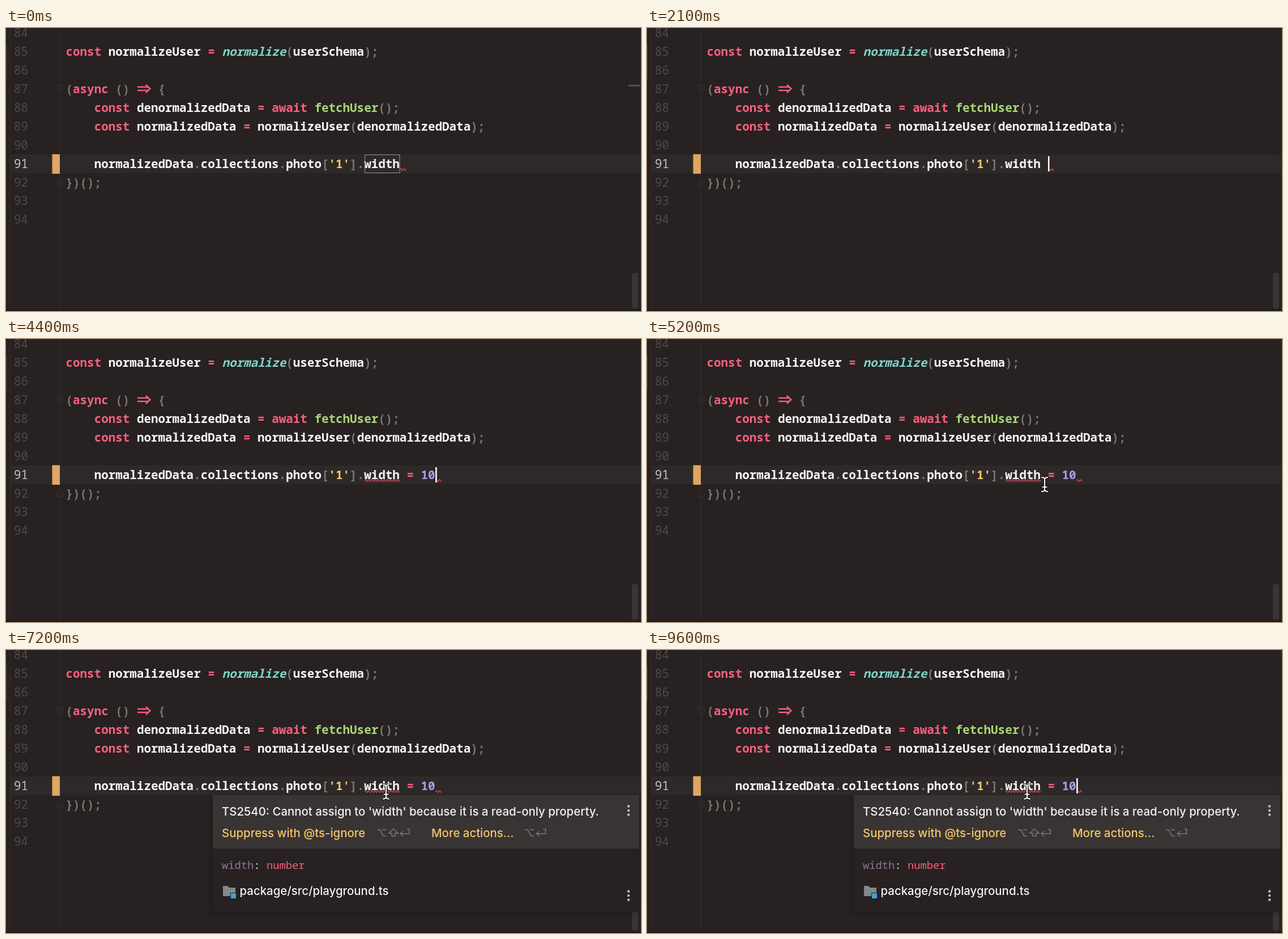
An HTML page with a canvas for the animation above (9800 ms loop, 1121 by 499 pixels).

```html
<!DOCTYPE html>
<html lang="en">
<head>
<meta charset="utf-8">
<title>Read-only property check</title>
<style>
html, body { margin: 0; width: 100%; height: 100%; overflow: hidden; background: #272121; }
canvas { display: block; width: 1121px; height: 499px; }
</style>
</head>
<body>
<canvas id="stage"></canvas>
<script>
const W = 1121, H = 499, LOOP = 9800;
const COL = 12.54, LEFT = 105.5, ROW = 32.93;
const MONO = '"Noto Sans Mono", "DejaVu Sans Mono", monospace';
const SANS = 'Inter, Roboto, sans-serif';
const C = {
  bg: '#272121', fg: '#fbf5f5', dim: '#7c7574', red: '#fa5f7e', green: '#a9d675',
  cyan: '#7dd6c8', yellow: '#f5c768', purple: '#a49fe6', num: '#4f4848', wave: '#e04a62'
};

const canvas = document.getElementById('stage');
const ctx = canvas.getContext('2d');
const dpr = window.devicePixelRatio || 1;
canvas.width = W * dpr;
canvas.height = H * dpr;

const xAt = col => LEFT + col * COL;
const baseline = row => 246.6 + (row - 91) * ROW;

function rect(x, y, w, h, color) {
  ctx.fillStyle = color;
  ctx.fillRect(x, y, w, h);
}

function text(str, x, y, color, font) {
  ctx.font = font;
  ctx.fillStyle = color;
  ctx.fillText(str, x, y);
}

function stroke(points, color, width) {
  ctx.strokeStyle = color;
  ctx.lineWidth = width;
  ctx.beginPath();
  points.forEach(([x, y], i) => i ? ctx.lineTo(x, y) : ctx.moveTo(x, y));
  ctx.stroke();
}

// Draws coloured spans on the character grid: [text, colour, style]
function code(row, col, spans) {
  for (const [str, color, style = ''] of spans) {
    text(str, xAt(col), baseline(row), C[color], `${style} 600 20.9px ${MONO}`);
    col += str.length;
  }
}

function wave(x, y, w) {
  const pts = [];
  for (let d = 0; d <= w; d += 0.5) pts.push([x + d, y - 1.6 * Math.sin(d / 5.6 * Math.PI * 2)]);
  stroke(pts, C.wave, 1.3);
}

function fold(y, dir) {
  stroke([[90, y - 6 * dir], [101, y - 6 * dir], [101, y + 2 * dir], [95.5, y + 7 * dir],
    [90, y + 2 * dir], [90, y - 6 * dir]], '#383232', 1);
  stroke([[93, y - dir], [98, y - dir]], '#383232', 1);
}

function arrow(x, y) {
  stroke([[x + 1, y - 3], [x + 20, y - 3]], C.red, 2.4);
  stroke([[x + 1, y + 3], [x + 20, y + 3]], C.red, 2.4);
  stroke([[x + 16, y - 7], [x + 23.5, y], [x + 16, y + 7]], C.red, 2.4);
}

function editor(t) {
  rect(0, 0, W, H, C.bg);
  rect(0, 28, 1, 62, '#4a4444');
  rect(7, 0, 1, H, '#332d2d');
  rect(8, 223, W - 8, 33, '#2e2929');
  rect(95, 0, 1, H, '#332d2d');
  rect(81.5, 222.5, 13.5, 34.5, '#dfa661');

  for (let n = 84; n <= 94; n++) {
    text(n, 14, baseline(n), n === 91 ? '#c8c2c2' : C.num, `500 20.9px ${MONO}`);
  }
  fold(107, 1);
  fold(272, -1);

  code(85, 0, [['const', 'red'], [' normalizeUser ', 'fg'], ['= ', 'red'],
    ['normalize', 'cyan', 'italic'], ['(', 'dim'], ['userSchema', 'fg'], [');', 'dim']]);
  code(87, 0, [['(', 'dim'], ['async', 'red'], [' ()', 'dim'], ['    {', 'dim']]);
  arrow(xAt(10), 107);
  code(88, 4, [['const', 'red'], [' denormalizedData ', 'fg'], ['= await ', 'red'],
    ['fetchUser', 'green'], ['();', 'dim']]);
  code(89, 4, [['const', 'red'], [' normalizedData ', 'fg'], ['= ', 'red'],
    ['normalizeUser', 'fg'], ['(', 'dim'], ['denormalizedData', 'fg'], [');', 'dim']]);
  code(91, 4, [['normalizedData', 'fg'], ['.', 'dim'], ['collections', 'fg'], ['.', 'dim'],
    ['photo', 'fg'], ['[', 'dim'], ["'1'", 'yellow'], ['].', 'dim'], ['width', 'fg']]);
  code(92, 0, [['})();', 'dim']]);

  // Usage marker, gone once the word is no longer selected
  if (t < 1900) rect(1099, 100, 22, 3, '#47545f');
  ctx.fillStyle = '#3a3535';
  ctx.beginPath();
  ctx.roundRect(1105, 432, 11, 63, 4);
  ctx.fill();
  rect(1119, 0, 1, H, '#312c2c');
  rect(0, 497, W, 2, '#1c1818');
}

// Each key press: time and the text after "width" from then on
const keys = [[-540, ''], [1600, ' '], [2900, ' ='], [3200, ' = '], [3900, ' = 1'], [4300, ' = 10']];
const BLINK = 520;

function typing(t) {
  const [time, tail] = keys.filter(k => k[0] <= t).pop();
  const end = xAt(47 + tail.length);

  if (!tail) {
    ctx.strokeStyle = '#8d8787';
    ctx.lineWidth = 1.2;
    ctx.strokeRect(633.5, 223.5, 61.5, 32);
  }
  code(91, 47, [[tail.slice(0, 3), 'red'], [tail.slice(3), 'purple']]);
  wave(end + 1, 249.5, 10);
  if (t >= 4300) wave(633, 249.5, 62);
  if (t >= 3000 && t < 4000) wave(LEFT, 283, 12);
  if ((t - time) % (2 * BLINK) < BLINK) rect(end + 0.5, 226, 2.5, 27, '#ffffff');
}

function optionKey(x) {
  stroke([[x, 317], [x + 5, 317], [x + 11, 328], [x + 16, 328]], C.dim, 1.6);
  stroke([[x + 9, 317], [x + 16, 317]], C.dim, 1.6);
}

function shiftKey(x) {
  stroke([[x + 5, 328], [x + 5, 323], [x, 323], [x + 8, 315.5], [x + 16, 323],
    [x + 11, 323], [x + 11, 328], [x + 5, 328], [x + 5, 323]], C.dim, 1.5);
}

function enterKey(x) {
  stroke([[x + 13, 316], [x + 17, 316], [x + 17, 324], [x + 1, 324]], C.dim, 1.6);
  stroke([[x + 6, 319.5], [x + 1, 324], [x + 6, 328.5]], C.dim, 1.6);
}

function dots(y) {
  ctx.fillStyle = '#bcb6b6';
  for (let i = -1; i <= 1; i++) {
    ctx.beginPath();
    ctx.arc(1099, y + i * 7.5, 2.3, 0, Math.PI * 2);
    ctx.fill();
  }
}

function popup() {
  ctx.save();
  ctx.shadowColor = 'rgba(0, 0, 0, 0.3)';
  ctx.shadowBlur = 10 * dpr;
  ctx.shadowOffsetY = 3 * dpr;
  rect(365, 256, 753, 205, C.bg);
  ctx.restore();
  rect(365, 256, 753, 94, '#393434');

  const ui = `500 20.4px ${SANS}`, mono = `500 18.75px ${MONO}`;
  text("TS2540: Cannot assign to 'width' because it is a read-only property.", 381, 292, '#f6f1f1', ui);
  text('Suppress with @ts-ignore', 381, 329.5, C.yellow, ui);
  text('More actions...', 751, 329.5, C.yellow, ui);
  optionKey(655);
  shiftKey(676);
  enterKey(695);
  optionKey(916);
  enterKey(935.5);

  text('width', 381, 386, '#8d7796', mono);
  text(':', 437.5, 386, C.fg, mono);
  text('number', 460, 386, C.red, mono);

  ctx.fillStyle = '#7f8a8c';
  ctx.beginPath();
  ctx.moveTo(383, 416);
  ctx.lineTo(391, 416);
  ctx.lineTo(394, 419);
  ctx.lineTo(405, 419);
  ctx.lineTo(405, 434);
  ctx.lineTo(383, 434);
  ctx.fill();
  rect(396, 428, 11, 10, C.bg);
  rect(397, 429, 9, 9, '#3aa5d8');
  text('package/src/playground.ts', 412.5, 431.5, '#f6f1f1', ui);
  dots(283);
  dots(433);
}

// Pointer moves: start, end, visible until, from, to
const moves = [
  [700, 1100, 1600, [741, 343], [733, 263]],
  [4800, 5600, LOOP, [733, 263], [671, 250]]
];

function pointer(t) {
  const move = moves.find(m => t >= m[0] && t < m[2]);
  if (!move) return;
  const [start, end, , from, to] = move;
  const p = Math.min(1, (t - start) / (end - start));
  const e = p * p * (3 - 2 * p);
  const x = from[0] + (to[0] - from[0]) * e;
  const y = from[1] + (to[1] - from[1]) * e;

  ctx.save();
  ctx.lineCap = 'round';
  for (const [color, width] of [['#151212', 4.2], ['#ffffff', 2]]) {
    stroke([[x - 5, y - 12.5], [x - 2, y - 12], [x, y - 10], [x + 2, y - 12], [x + 5, y - 12.5]], color, width);
    stroke([[x - 5, y + 12.5], [x - 2, y + 12], [x, y + 10], [x + 2, y + 12], [x + 5, y + 12.5]], color, width);
    stroke([[x, y - 10], [x, y + 10]], color, width);
    stroke([[x - 3.5, y + 4.5], [x + 3.5, y + 4.5]], color, width);
  }
  ctx.restore();
}

function draw(now) {
  const t = Math.floor((now % LOOP) / 100) * 100;
  ctx.setTransform(dpr, 0, 0, dpr, 0, 0);
  editor(t);
  typing(t);
  if (t >= 6500) popup();
  pointer(t);
}

let begin;
function tick(now) {
  begin ??= now;
  draw(now - begin);
  requestAnimationFrame(tick);
}
requestAnimationFrame(tick);
</script>
</body>
</html>
```
